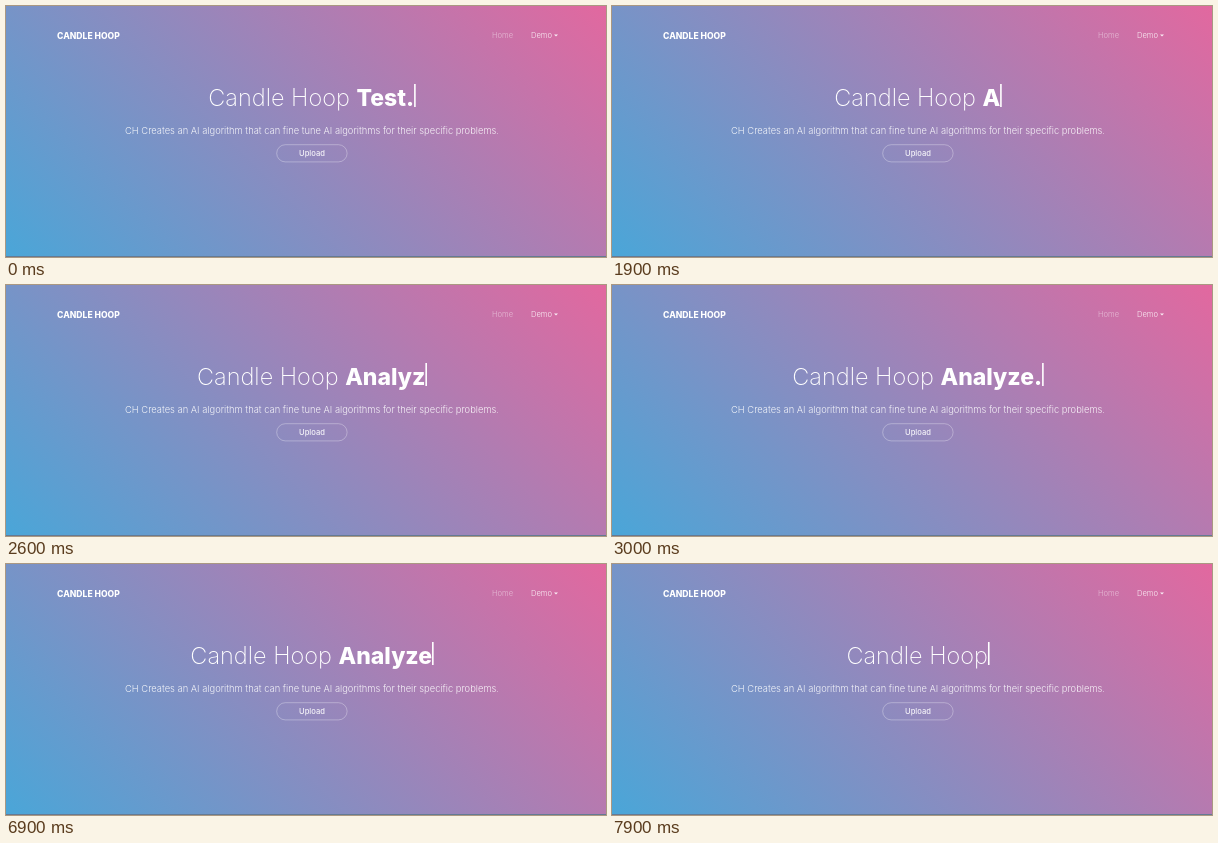
An HTML page with a canvas that plays this animation: 600x251 px, repeating every 8000 ms.

```html
<!DOCTYPE html>
<html lang="en">
<head>
<meta charset="utf-8">
<title>Candle Hoop</title>
<style>
html, body { margin: 0; width: 100%; height: 100%; overflow: hidden; }
canvas { display: block; width: 600px; height: 251px; }
</style>
</head>
<body>
<canvas id="stage"></canvas>
<script>
const W = 600, H = 251, LOOP = 8000, CENTER = 306;
const canvas = document.getElementById('stage');
const ctx = canvas.getContext('2d');
const ratio = window.devicePixelRatio || 1;
canvas.width = W * ratio;
canvas.height = H * ratio;
ctx.scale(ratio, ratio);

const font = (weight, size) => `${weight} ${size}px Inter, "Open Sans", sans-serif`;
const white = alpha => `rgba(255,255,255,${alpha})`;

// Number of keystrokes made by time t, the first one at start.
const strokes = (t, start, step) => Math.max(0, Math.floor((t - start) / step) + 1);

function typedWord(t) {
  if (t < 1900) {
    const word = 'Test.';
    return word.slice(0, Math.max(0, word.length - strokes(t, 1080, 80)));
  }
  const word = 'Analyze.';
  const left = word.length - strokes(t, 6900, 100);
  return word.slice(0, Math.max(0, Math.min(strokes(t, 1900, 130), left)));
}

function text(str, x, y, weight, size, alpha = 1, align = 'left') {
  ctx.font = font(weight, size);
  ctx.textAlign = align;
  ctx.fillStyle = white(alpha);
  ctx.fillText(str, x, y);
}

function widthOf(str, weight, size) {
  ctx.font = font(weight, size);
  return ctx.measureText(str).width;
}

function drawBackground() {
  const reach = (W + H) / 4;
  const fill = ctx.createLinearGradient(W / 2 - reach, H / 2 + reach, W / 2 + reach, H / 2 - reach);
  fill.addColorStop(0, '#4aa6d8');
  fill.addColorStop(1, '#e2689f');
  ctx.fillStyle = fill;
  ctx.fillRect(0, 0, W, H);
  ctx.fillStyle = '#647a94';
  ctx.fillRect(0, H - 1, W, 1);
}

function drawNav() {
  text('CANDLE HOOP', 51, 32.6, 800, 8.6);
  text('Home', 486, 32.2, 300, 7.6, 0.5);
  text('Demo', 525, 32.2, 300, 7.6, 0.88);
  ctx.beginPath();
  ctx.moveTo(548, 28.4);
  ctx.lineTo(552, 28.4);
  ctx.lineTo(550, 30.4);
  ctx.fill();
}

function drawTitle(word) {
  const leadSize = 23.5, wordSize = 23, cursor = 1.6;
  const lead = word ? 'Candle Hoop ' : 'Candle Hoop';
  const leadWidth = widthOf(lead, 200, leadSize);
  const wordWidth = widthOf(word, 800, wordSize);
  const x = CENTER - (leadWidth + wordWidth + cursor) / 2;
  text(lead, x, 100, 200, leadSize);
  text(word, x + leadWidth, 100, 800, wordSize);
  ctx.fillRect(x + leadWidth + wordWidth, 78, cursor, 23);
}

function drawButton() {
  ctx.beginPath();
  ctx.roundRect(270.7, 138.7, 70.4, 17.2, 8.6);
  ctx.lineWidth = 0.8;
  ctx.strokeStyle = white(0.38);
  ctx.stroke();
  text('Upload', CENTER, 150, 500, 7.6, 0.9, 'center');
}

function draw(t) {
  drawBackground();
  drawNav();
  drawTitle(typedWord(t));
  text('CH Creates an AI algorithm that can fine tune AI algorithms for their specific problems.',
    CENTER, 128, 300, 9.36, 0.88, 'center');
  drawButton();
}

const begin = performance.now();
function frame() {
  draw((performance.now() - begin) % LOOP);
  requestAnimationFrame(frame);
}
frame();
</script>
</body>
</html>
```
